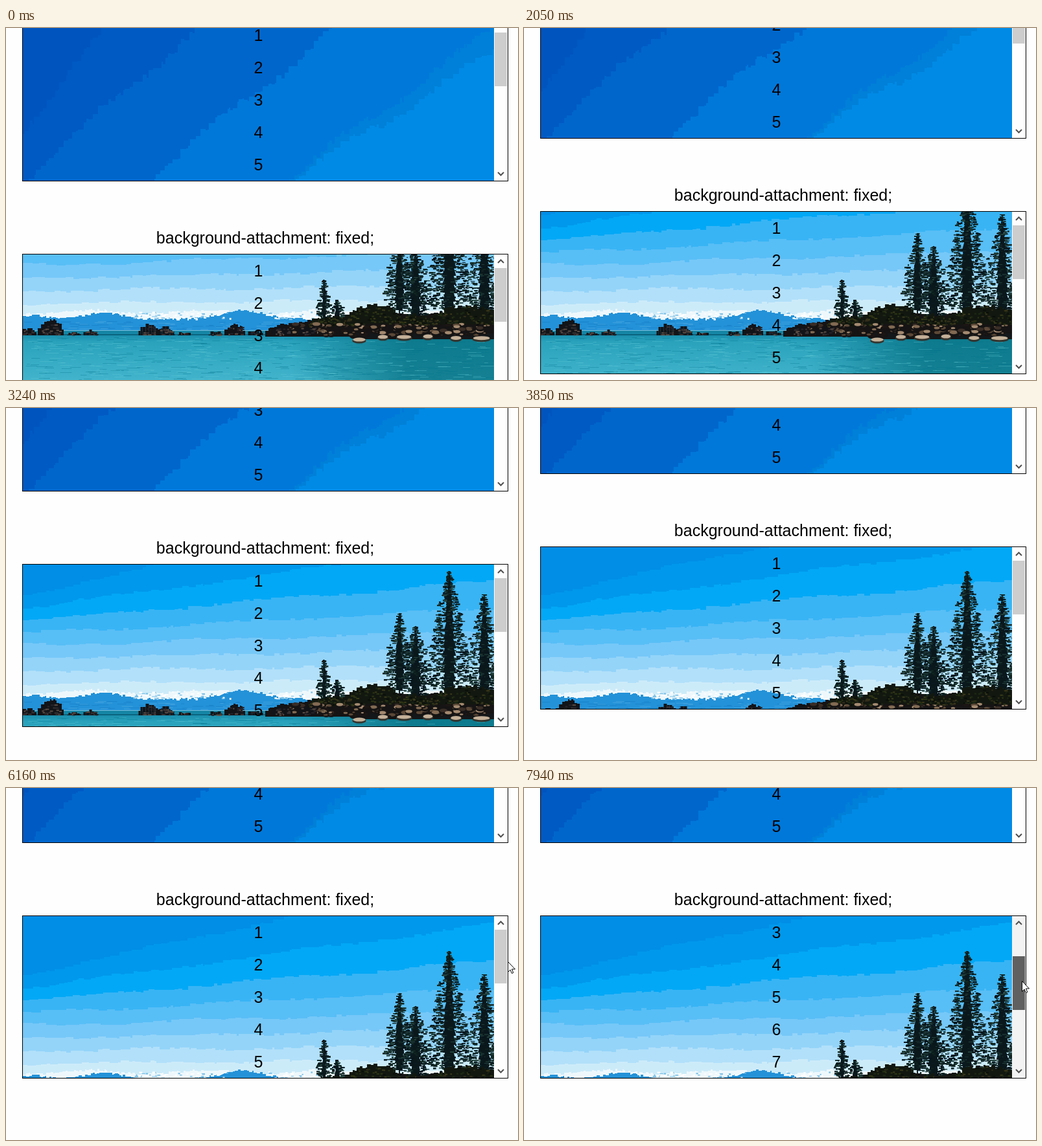
Write an HTML page with a canvas that moves like this. It is 790 by 544 pixels and loops after 8 s.

```html
<!DOCTYPE html>
<html lang="en">
<head>
<meta charset="utf-8">
<title>background-attachment</title>
<style>
  html, body { margin: 0; width: 100%; height: 100%; overflow: hidden; background: #fefefe; }
  canvas { display: block; }
</style>
</head>
<body>
<canvas id="stage" width="790" height="544"></canvas>
<script>
const W = 790, H = 544, LOOP = 8000;
const LEFT = 25, BOX_W = 750, BOX_H = 252, BAR_X = 753, VIEW_W = BAR_X - LEFT - 1;
const ctx = document.getElementById('stage').getContext('2d');

let seed = 7;
const rand = () => {
  seed = (Math.imul(seed, 1664525) + 1013904223) >>> 0;
  return seed / 4294967296;
};
const between = (a, b) => a + (b - a) * rand();
const spread = n => between(-n, n);
const pick = list => list[Math.floor(rand() * list.length)];
const hump = (x, center, width) => Math.exp(-(((x - center) / width) ** 2));

function layer(paint) {
  const c = document.createElement('canvas');
  c.width = W;
  c.height = H;
  paint(c.getContext('2d'));
  return c;
}

function rect(g, color, x, y, w, h) {
  g.fillStyle = color;
  g.fillRect(x, y, w, h);
}

function oval(g, color, x, y, rx, ry, from = 0, to = 2 * Math.PI) {
  g.fillStyle = color;
  g.beginPath();
  g.ellipse(x, y, rx, ry, 0, from, to);
  g.fill();
}

// Fills everything below a ragged contour y = top(x)
function below(g, color, top, { rough = 2, grain = 8, from = LEFT + 1, to = BAR_X, bottom = H } = {}) {
  for (let x = from; x < to;) {
    const w = Math.min(to - x, 2 + Math.floor(rand() * grain));
    const y = Math.round(top(x + w / 2) + spread(rough));
    if (y < bottom) rect(g, color, x, y, w, bottom - y);
    x += w;
  }
}

const upperSky = layer(g => {
  rect(g, '#0054be', 0, 0, W, H);
  // Each shade starts on a diagonal from (x0, 0) down to (x1, 236)
  [['#005ac4', 155, -40], ['#0066cc', 295, 26], ['#0078da', 510, 215], ['#0080d8', 755, 430], ['#008ae6', 810, 440]]
    .forEach(([color, x0, x1]) => {
      const top = x => 236 * (x0 - x) / (x0 - x1) + 7 * Math.sin(x / 30);
      below(g, color, top, { rough: 5 });
    });
});

function tree(g, x, top, foot, half, ground) {
  const needles = ['#06131a', '#0a1c22', '#102620', '#183030', '#22403c'];
  rect(g, '#1c1c1a', x - 1, top, 2, ground - top);
  for (let y = top; y < foot; y += 2) {
    const r = (y - top) / (foot - top);
    const bough = .65 + .35 * ((y - top) % 13) / 13;
    const reach = half * Math.min(1, .08 + r * 1.5) * Math.min(1, (1.25 - r) * 2.5) * bough;
    for (let i = 0; i < 2 + reach / 3.5; i++) {
      const w = between(2, 7);
      rect(g, pick(needles), Math.round(x + spread(reach) - w / 2), y + Math.round(spread(2)), w, between(1, 3));
    }
    rect(g, '#0a181c', x - reach * .3, y, reach * .6, 2);
  }
}

function bush(g, from, to, base, height, bottom) {
  const top = x => base - height * Math.sqrt(Math.sin(Math.PI * (x - from) / (to - from)));
  below(g, '#12180f', top, { rough: 3, grain: 5, from, to, bottom });
  for (let x = from + 1; x < to - 1; x += 1.2) {
    rect(g, pick(['#2c3414', '#3a3a1a', '#1e2a14', '#0a0e0a', '#322c1a']), x, between(top(x), bottom), between(2, 5), 2);
  }
}

function islet(g, x, h) {
  const half = 8 + h * .5;
  below(g, '#121418', u => 475 - h * Math.sqrt(Math.max(.05, 1 - ((u - x) / half) ** 2)),
    { rough: 2, grain: 4, from: Math.max(26, x - half), to: x + half, bottom: 475 });
  for (let i = 0; i < h; i++) {
    rect(g, pick(['#3a3434', '#26242a', '#5a4c44']), x + spread(half * .7), 474 - rand() * h * .75, between(2, 6), 2);
  }
}

function paintWater(g) {
  const depth = g.createLinearGradient(0, 470, 0, H);
  depth.addColorStop(0, '#1484a4');
  depth.addColorStop(.2, '#2aa2bc');
  depth.addColorStop(1, '#42b4cc');
  rect(g, depth, 0, 468, W, H - 468);
  const shade = g.createLinearGradient(440, 0, 620, 0);
  shade.addColorStop(0, 'rgba(0,104,120,0)');
  shade.addColorStop(1, 'rgba(0,104,120,.68)');
  rect(g, shade, 440, 474, 313, H - 474);
  for (let i = 0; i < 600; i++) {
    const x = between(26, 740), y = between(478, H);
    const dark = rand() < .3 + x / 1800;
    rect(g, dark ? 'rgba(0,116,140,.35)' : 'rgba(96,200,212,.35)', x, Math.round(y), between(4, 22), 1);
  }
  rect(g, '#0a6480', 26, 473, VIEW_W, 2);
  rect(g, '#78bcd4', 26, 467, 440, 1);
}

function paintShore(g) {
  below(g, '#161414', x => 472 - 30 * Math.min(1, Math.sqrt((x - 400) / 150)),
    { grain: 5, from: 400, bottom: 477 });
  rect(g, '#14181a', 540, 472, 213, 9);

  // x, top, end of foliage, half width, ground
  [[491, 391, 450, 12, 455], [511, 421, 450, 14, 455], [632, 338, 444, 30, 450],
    [607, 318, 436, 25, 460], [738, 290, 442, 32, 446], [684, 253, 440, 36, 452]]
    .forEach(t => tree(g, ...t));

  bush(g, 466, 540, 458, 12, 461);
  bush(g, 525, 612, 454, 26, 457);
  bush(g, 600, 660, 456, 12, 458);
  bush(g, 652, 770, 456, 26, 458);

  for (let i = 0; i < 130; i++) {
    const x = between(440, 750), r = between(2, 9);
    const y = between(458, 476);
    oval(g, '#161414', x, y + 1, r, r * .55);
    oval(g, pick(['#3a2e26', '#5c4836', '#826a52', '#a48a70', '#1c1614']), x - 1, y - r * .1, r * .75, r * .35);
  }
  for (let x = 545; x < BAR_X; x += between(28, 44)) {
    const y = between(477, 484), r = between(8, 16);
    oval(g, '#34342e', x, y + 1, r, 4);
    oval(g, '#c4b098', x, y - 1, r * .9, 3);
  }
}

const lake = layer(g => {
  rect(g, '#008ee6', 0, 0, W, H);
  ['#0098ec', '#02a8f6', '#38b4f4', '#58bef6', '#76c8f8', '#94d4f9', '#b2e0fa', '#ccebf9'].forEach((color, i) => {
    const top = x => 290 + 19.4 * i - 160 * .62 ** i * (x - 26) / VIEW_W + 2 * Math.sin(x / 45 + i);
    below(g, color, top, { grain: 16 });
  });

  below(g, '#eef8fc', x => 439 + 3 * Math.sin(x / 28), { grain: 4, bottom: 470 });
  below(g, '#2492d8', x => 450 - 6 * hump(x, 45, 30) - 10 * hump(x, 150, 40) - 14 * hump(x, 365, 45),
    { grain: 4, bottom: 468 });
  for (let i = 0; i < 130; i++) {
    const x = between(190, 480), snowy = 1 - hump(x, 365, 50);
    if (rand() < snowy) rect(g, pick(['#fff', '#fff', '#7cc0e6']), x, between(438, 449), between(2, 6), between(1, 3));
  }
  for (let i = 0; i < 90; i++) {
    rect(g, pick(['#40a2de', '#1a84cc']), between(26, 460), between(453, 466), between(4, 18), 1);
  }
  paintWater(g);
  paintShore(g);
  [[34, 10], [69, 24], [105, 5], [131, 7], [221, 17], [246, 13], [275, 4], [323, 5], [353, 16], [385, 7], [426, 16], [465, 14]]
    .forEach(([x, h]) => islet(g, x, h));
});

// The screen refreshes in fixed ticks
const TICK = 120;
const tickOf = t => Math.floor((t + 10) / TICK) * TICK - 10;

// The page is dragged in bursts with pauses between: [ms, offset]
const drag = [[950, 0], [1310, 23], [2030, 66], [2630, 92], [2870, 97], [2990, 97], [3470, 119],
  [3710, 119], [3830, 135], [4070, 135], [4310, 147], [4910, 147], [5030, 152]];

function pageScroll(t) {
  const next = drag.findIndex(([time]) => time > t);
  if (next === 0) return 0;
  if (next < 0) return drag[drag.length - 1][1];
  const [t0, y0] = drag[next - 1], [t1, y1] = drag[next];
  return Math.round(y0 + (y1 - y0) * (t - t0) / (t1 - t0));
}

const ENTER = 5390, HOVER = 6230, PRESS = 6710;

const innerScroll = t => t < PRESS ? 0 : Math.round(100 * ((t - PRESS + TICK) / (LOOP - PRESS + 30)) ** 1.4);
const thumbShift = scroll => Math.floor(scroll * .41);

function cursorAt(t, scroll) {
  if (t >= HOVER) return [768, 257 + thumbShift(scroll)];
  const p = (t - ENTER) / (HOVER - TICK - ENTER);
  return [778 - 4 * p - 223 * Math.sin(Math.PI * p), 146 + 122 * p * p].map(Math.round);
}

function chevron(x, y, dir) {
  ctx.strokeStyle = '#505050';
  ctx.lineWidth = 2;
  ctx.beginPath();
  ctx.moveTo(x - 4.5, y + 2.5 * dir);
  ctx.lineTo(x, y - 2 * dir);
  ctx.lineTo(x + 4.5, y + 2.5 * dir);
  ctx.stroke();
}

function drawBox(top, image, imageY, scroll, thumbColor, trackColor) {
  ctx.save();
  ctx.beginPath();
  ctx.rect(LEFT + 1, top + 1, BOX_W - 2, BOX_H - 2);
  ctx.clip();
  ctx.drawImage(image, 0, imageY);
  ctx.fillStyle = '#000';
  for (let n = 1; n <= 9; n++) ctx.fillText(n, 389.5, top + 35 + (n - 1) * 50 - scroll);
  rect(ctx, trackColor, BAR_X, top, 21, BOX_H);
  rect(ctx, thumbColor, BAR_X + 1, top + 22 + thumbShift(scroll), 19, 83);
  chevron(763.5, top + 11.5, 1);
  chevron(763.5, top + 240.5, -1);
  ctx.restore();
  ctx.strokeStyle = '#000';
  ctx.lineWidth = 1;
  ctx.strokeRect(LEFT + .5, top + .5, BOX_W - 1, BOX_H - 1);
}

function drawCursor(x, y) {
  ctx.beginPath();
  [[.5, .5], [.5, 16.5], [4, 13], [6.5, 18.5], [8.8, 17.5], [6.5, 12], [11.5, 12]]
    .forEach(([dx, dy]) => ctx.lineTo(x + dx, y + dy));
  ctx.closePath();
  ctx.fillStyle = '#fff';
  ctx.fill();
  ctx.strokeStyle = '#000';
  ctx.lineWidth = 1;
  ctx.stroke();
}

function draw() {
  const t = tickOf(performance.now() % LOOP);
  const page = pageScroll(t);
  const scroll = innerScroll(t);
  const pressed = t >= PRESS;
  const thumb = pressed ? '#606060' : t >= HOVER ? '#a6a6a6' : '#cdcdcd';

  rect(ctx, '#fefefe', 0, 0, W, H);
  ctx.font = '25px "Liberation Sans", Arial, sans-serif';
  ctx.textAlign = 'center';
  drawBox(-15 - page, upperSky, -page, 0, '#cdcdcd', '#fefefe');
  ctx.fillStyle = '#000';
  ctx.fillText('background-attachment: fixed;', 400, 333 - page);
  drawBox(349 - page, lake, 0, scroll, thumb, pressed ? '#f3f3f3' : '#fefefe');
  if (t >= ENTER) drawCursor(...cursorAt(t, scroll));
  requestAnimationFrame(draw);
}
draw();
</script>
</body>
</html>
```
